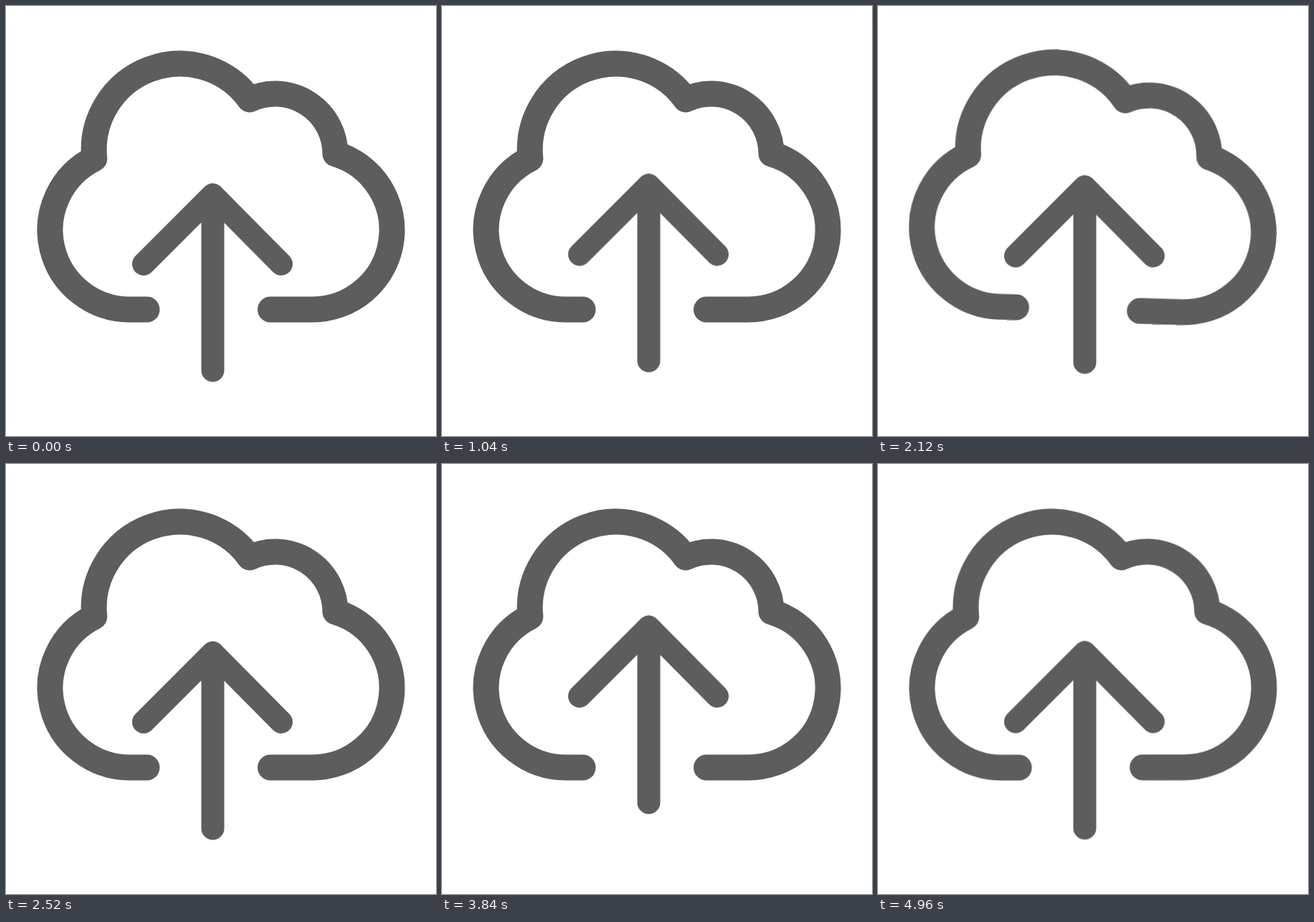
Write an HTML page without scripts that moves like this. It is 600 px wide and 600 px high and loops after 5000 ms.

```html
<!DOCTYPE html>
<html lang="en">
<head>
<meta charset="utf-8">
<title>Cloud upload</title>
<style>
  html, body { margin: 0; width: 100%; height: 100%; overflow: hidden; background: #fff; }
  svg { display: block; width: 100%; height: 100%; }

  path { fill: none; stroke: #5d5d5d; stroke-linecap: round; stroke-linejoin: round; }

  .cloud {
    stroke-width: 36;
    transform-origin: 300px 300px;
    animation: shake 2500ms cubic-bezier(.333, 0, .667, 1) -2480ms infinite;
  }

  .arrow {
    stroke-width: 32;
    animation: push 5000ms -4980ms infinite;
  }

  /* Slow start, late rush up, even fall; the second push is stronger. */
  @keyframes push {
    0%, 50%, 100% { transform: translateY(0); animation-timing-function: cubic-bezier(.7, 0, .95, 1); }
    29.8% { transform: translateY(-32.7px); animation-timing-function: cubic-bezier(.333, 0, .667, 1); }
    79.8% { transform: translateY(-47px); animation-timing-function: cubic-bezier(.333, 0, .667, 1); }
  }

  @keyframes shake {
    0%, 58.7%    { transform: rotate(0deg); }
    66.7%, 82.7% { transform: rotate(2deg); }
    74.7%, 90.7% { transform: rotate(-2deg); }
    98.7%, 100%  { transform: rotate(0deg); }
  }
</style>
</head>
<body>
<svg viewBox="0 0 600 600">
  <path class="cloud" d="M196.5 423.5H173A111 111 0 0 1 123.3 213A120 120 0 0 1 340 130.4A84 84 0 0 1 459.5 206.2A111 111 0 0 1 427 423.5H369"/>
  <path class="arrow" d="M192 360L288.4 263.6L384 360M288.5 263.6V508.5"/>
</svg>
</body>
</html>
```
